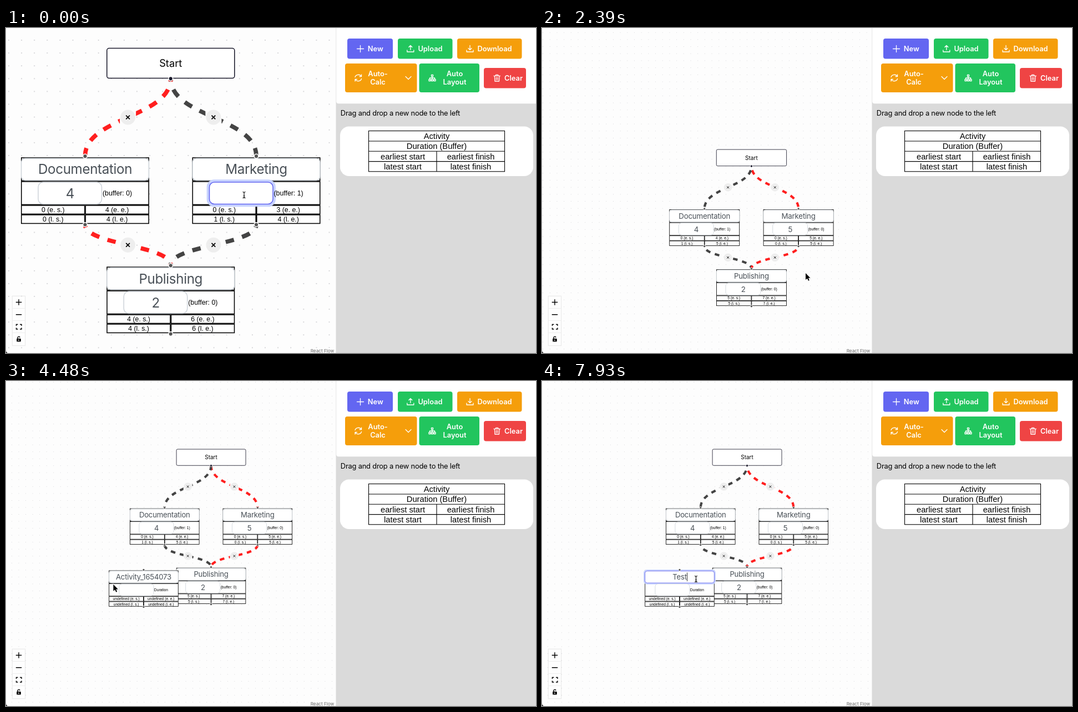
An HTML page for the animation above (8000 ms loop, 955 px wide and 586 px high).

```html
<!DOCTYPE html>
<html lang="en">
<head>
<meta charset="utf-8">
<title>Activity network editor</title>
<style>
  html, body { margin: 0; height: 100%; overflow: hidden; background: #fdfdfd; }
  svg { display: block; width: 100vw; height: 100vh; }
  text { font-family: Inter, Roboto, sans-serif; text-anchor: middle; white-space: pre; }
  .cell { font-family: "Liberation Sans", Arial, sans-serif; }
  .field { letter-spacing: -.015em; fill: #495057; }
  .left { text-anchor: start; }
  .btn { font-weight: 600; fill: #fff; }
  .icon { fill: none; stroke: #fff; stroke-width: 1.3; stroke-linecap: round; stroke-linejoin: round; }
</style>
</head>
<body>
<svg viewBox="0 0 955 586">
  <defs>
    <pattern id="dots" width="23.1" height="23.1" patternUnits="userSpaceOnUse" x="-6.5" y="10.5">
      <circle cx="11.5" cy="11.5" r=".65" fill="#81818a"/>
    </pattern>
    <filter id="shadow" x="-10%" y="-30%" width="120%" height="160%">
      <feDropShadow dx="0" dy="2" stdDeviation="4" flood-opacity=".3"/>
    </filter>
    <g id="table"></g>
  </defs>
  <rect width="955" height="586" fill="#fdfdfd"/>
  <g id="graph"></g>
  <g id="chrome"></g>
  <g id="overlay"></g>
</svg>
<script>
const LOOP = 8000, STEP = 149.6;
const RED = '#ff1f1f', DARK = '#444', INDIGO = '#6366f1', GREEN = '#22c55e', AMBER = '#f59e0b';
const $ = id => document.getElementById(id);

const text = (s, x, y, size, cls = '') =>
  `<text x="${x}" y="${y + size * .362}" font-size="${size}" class="${cls}">${s}</text>`;
const rect = (x, y, w, h, attrs) => `<rect x="${x}" y="${y}" width="${w}" height="${h}" ${attrs}/>`;
const path = (d, attrs) => `<path d="${d}" ${attrs}/>`;

// Linear interpolation through rows of [time, ...values]
function track(rows, t) {
  const i = rows.findIndex(r => r[0] > t);
  if (i < 0) return rows[rows.length - 1].slice(1);
  if (i === 0) return rows[0].slice(1);
  const a = rows[i - 1], b = rows[i], p = (t - a[0]) / (b[0] - a[0]);
  return a.slice(1).map((v, j) => v + (b[j + 1] - v) * p);
}

const VIEW = [
  [1800, 1, 0, 0], [2290, .549, 214.5, 199], [2400, .549, 214.5, 199],
  [2540, .543, 217.3, 201.7], [2900, .543, 208.4, 103.1]
];
const POINTER = [
  [0, 429, 301], [600, 429, 301], [1050, 466, 457], [1500, 475, 442], [2540, 475, 442],
  [2900, 469, 349], [2995, 469, 349], [3280, 777, 189], [3440, 537, 250], [3590, 340, 310],
  [3740, 182, 343], [4200, 182, 343], [4780, 205, 391], [5230, 270, 364], [5530, 293, 356],
  [5980, 285, 370], [6430, 277.5, 357]
];

const pen = document.createElement('canvas').getContext('2d');
pen.font = '24.2px Inter, Roboto, sans-serif';
const nameWidth = s => pen.measureText(s).width - s.length * .36;

const handle = (x, y, fill = '#555') =>
  `<circle cx="${x}" cy="${y}" r="3.85" fill="${fill}" stroke="#fff" stroke-width="1.54"/>`;

function input(x, y, w, h, r, state) {
  const border = state ? INDIGO : '#ced4da';
  const ring = state === 'focus'
    ? rect(x - 2.4, y - 2.4, w + 4.8, h + 4.8, `rx="${r + 2}" fill="none" stroke="#c7d2fe" stroke-width="4.9"`) : '';
  return ring + rect(x, y, w, h, `rx="${r}" fill="#fff" stroke="${border}" stroke-width="1.54"`);
}

const box = (x, y, w, h) =>
  rect(x + .77, y + .77, w - 1.54, h - 1.54, 'fill="#fff" stroke="#000" stroke-width="1.54"');

// times: earliest start, earliest end, latest start, latest end
function activity(cx, top, o) {
  const x = cx - 115.5, half = 115.5, field = cx - (o.note === 'Duration' ? 81.2 : 84.5);
  const [es, ee, ls, le] = o.times;
  const cell = (s, dx, dy) => text(s, cx + dx, top + dy, 12.3, 'cell');
  return box(x, top, 231, 43) + box(x, top + 43, 231, 43)
    + box(x, top + 86, half, 17) + box(cx, top + 86, half, 17)
    + box(x, top + 103, half, 17) + box(cx, top + 103, half, 17)
    + input(x + .6, top + 2, 229.8, 39.5, 7, o.nameState)
    + text(o.name, cx, top + 21.5, 24.2, 'field') + (o.caret || '')
    + input(field, top + 44.8, 114.5, 39.5, 9, o.valueState)
    + text(o.value, field + 57.5, top + 65, 24.2, 'field')
    + text(o.note, field + 116, top + 64.3, 12.3, 'cell left')
    + cell(`${es} (e. s.)`, -57.7, 94.3) + cell(`${ee} (e. e.)`, 57.7, 94.3)
    + cell(`${ls} (l. s.)`, -57.7, 111.5) + cell(`${le} (l. e.)`, 57.7, 111.5)
    + handle(cx, top - 2) + handle(cx, top + 121.3);
}

function edge(x0, y0, x1, y1, color, t) {
  const my = (y0 + y1) / 2, mx = (x0 + x1) / 2;
  return path(`M${x0} ${y0}C${x0} ${my} ${x1} ${my} ${x1} ${y1}`,
      `fill="none" stroke="${color}" stroke-width="7.7" stroke-dasharray="15.4" stroke-dashoffset="${10 - .02287 * t}"`)
    + rect(mx - 14.5, my - 14.5, 29, 29, 'fill="#fdfdfd"')
    + `<circle cx="${mx}" cy="${my}" r="13.4" fill="#eee"/>`
    + path(`M${mx - 3.4} ${my - 3.4}l6.8 6.8m0-6.8l-6.8 6.8`, 'stroke="#000" stroke-width="1.7"');
}

function newActivity(t) {
  const focused = t > 6550, cx = 72.9, top = 439.2;
  const typed = [7020, 7170, 7470, 7770].filter(at => t > at).length;
  const name = t < 6700 ? 'Activity_1654073' : 'Test'.slice(0, typed);
  const caret = t > 6700
    ? rect(cx + nameWidth(name) / 2 + .5, top + 7, 1.8, 29, 'fill="#333"') : '';
  return activity(cx, top, {
    name, caret, value: '', note: 'Duration', times: Array(4).fill('undefined'),
    nameState: focused ? 'focus' : t > 5250 ? 'hover' : ''
  });
}

function drawGraph(t) {
  const [k, x, y] = track(VIEW, t), done = t > 1190;
  const left = done ? DARK : RED, right = done ? RED : DARK;
  const L = 142.5, C = 296.75, R = 451;
  const end = done ? 5 : 4;
  $('graph').setAttribute('transform', `translate(${x} ${y}) scale(${k})`);
  $('graph').innerHTML = rect(-600, -600, 2400, 2400, 'fill="url(#dots)"')
    + edge(C, 91, R, 231, right, t) + edge(C, 91, L, 231, left, t)
    + edge(L, 354.5, C, 428, left, t) + edge(R, 354.5, C, 428, right, t)
    + rect(181.8, 36.6, 230, 54, 'rx="4" fill="#fff" stroke="#1a192b" stroke-width="1.54"')
    + text('Start', C, 63.7, 18.3, '') + handle(C, 91.3, '#1a192b')
    + activity(L, 233.2, {
        name: 'Documentation', value: 4, note: `(buffer: ${end - 4})`, times: [0, 4, end - 4, end] })
    + activity(R, 233.2, {
        name: 'Marketing', value: t > 500 ? 5 : '', valueState: done ? '' : 'focus',
        note: `(buffer: ${done ? 0 : 1})`, times: [0, done ? 5 : 3, done ? 0 : 1, end] })
    + activity(C, 430.3, {
        name: 'Publishing', value: 2, note: '(buffer: 0)', times: [end, end + 2, end, end + 2] })
    + (t > 4180 ? newActivity(t) : '');
}

function drawOverlay(t) {
  const [x, y] = track(POINTER, t);
  const beam = (t < 1100 && y < 318) || t > 4900;
  const ghost = t > 3330 && t < 4180
    ? `<g transform="translate(${x} ${y})">`
      + rect(-167, -4.5, 332, 74.5, 'fill="#fff" opacity=".87" filter="url(#shadow)"')
      + '<use href="#table" x="-124" y="-3"/></g>' : '';
  const arrow = 'M0 0V12L2.9 9.4L4.9 13.8L6.8 13L4.9 8.7H8.5Z';
  const ibeam = 'M-2.5-5.5Q0-5.5 0-3.5Q0-5.5 2.5-5.5M0-4V4M-2.5 5.5Q0 5.5 0 3.5Q0 5.5 2.5 5.5M-1.3 1.8H1.3';
  const cursor = beam
    ? path(ibeam, 'fill="none" stroke="#fff" stroke-width="2.6"') + path(ibeam, 'fill="none" stroke="#000" stroke-width="1.1"')
    : path(arrow, 'stroke="#fff" stroke-width="1.6" paint-order="stroke"');
  $('overlay').innerHTML = ghost + `<g transform="translate(${x} ${y})">${cursor}</g>`;
}

function button(x, y, w, h, color, icon, lines, tx) {
  return rect(x, y, w, h, `rx="4" fill="${color}"`) + path(icon, 'class="icon"')
    + lines.map((s, i) => text(s, tx, y + h / 2 + (i - (lines.length - 1) / 2) * 15.2, 12.85, 'btn')).join('');
}

function drawChrome() {
  const line = 'fill="none" stroke="#000" stroke-width="1.1"';
  $('table').innerHTML = rect(.5, .5, 245, 73.3, line)
    + path('M.5 19H245.5M.5 37.3H245.5M.5 55.6H245.5M123 37.3V73.8', line)
    + text('Activity', 123, 9.7, 14.7, 'cell') + text('Duration (Buffer)', 123, 28, 14.7, 'cell')
    + text('earliest start', 62, 46.4, 14.7, 'cell') + text('earliest finish', 184.5, 46.4, 14.7, 'cell')
    + text('latest start', 62, 64.8, 14.7, 'cell') + text('latest finish', 184.5, 64.8, 14.7, 'cell');

  const tray = 'V43H{R}V40';
  const trayAt = x => `M${x - 6} 40V43H${x + 6}V40`;
  const sidebar = rect(594.5, 0, 361, 586, 'fill="#dadada"')
    + rect(595.2, -10, 370, 146.3, 'rx="4" fill="#fff"')
    + button(615, 19, 82, 36.5, INDIGO, 'M632.5 37.5h12m-6-6v12', ['New'], 665.8)
    + button(706, 19, 98.5, 36.5, GREEN, trayAt(728.8) + 'M728.8 39.5V31.5m-3 3l3-3l3 3', ['Upload'], 764.5)
    + button(813, 19, 116.5, 36.5, AMBER, trayAt(836) + 'M836 31.5V39.5m-3-3l3 3l3-3', ['Download'], 880.5)
    + button(611, 64, 129.5, 52, AMBER,
        'M629 88.5A6 5.5 0 0 1 640 87M640.5 84v3.5h-3.5M640.5 91.5A6 5.5 0 0 1 629.5 93M629 96v-3.5h3.5M720 87.5l5 5l5-5',
        ['Auto-', 'Calc'], 670)
    + button(744.5, 64, 108.5, 52, GREEN,
        'M766.5 84.5h3v3h-3zM762 92.5h3v3h-3zM766.5 92.5h3v3h-3zM771 92.5h3v3h-3zM768 87.5v5M763.5 92.5v-2.5h9v2.5',
        ['Auto', 'Layout'], 808.5)
    + button(861, 72, 76, 36.5, '#ef4444',
        'M879 86.3h11.4M880.3 86.3l.6 9.7h7.6l.6-9.7M882.6 86.3v-2h4v2M883.4 89v4.5M886 89v4.5', ['Clear'], 914.5)
    + text('Drag and drop a new node to the left', 710.5, 153.7, 12.85, 'field').replace('<text', '<text style="fill:#000"')
    + rect(602, 177.5, 348, 89.5, 'rx="16" fill="#fff"')
    + '<use href="#table" x="653" y="185"/>';

  const thin = 'fill="none" stroke="#000" stroke-width="1.4"';
  const controls = rect(11.5, 483.5, 23, 89, 'fill="none" stroke="#000" stroke-opacity=".07" stroke-width="1.6"')
    + rect(12, 484, 22, 88, 'fill="#fefefe"')
    + path('M12 505.5h22M12 527.5h22M12 549.5h22', 'stroke="#eee"')
    + path('M17.8 494.5h10.4M23 489.3v10.4M17.8 516.7h10.4', thin)
    + path('M18.5 537v-2.5h3M25 534.5h3v2.5M28 540.5v2.5h-3M21.5 543h-3v-2.5', thin)
    + rect(19.2, 560, 7.6, 5.6, 'rx=".8"')
    + path('M20.8 560v-1.3a2.2 2.2 0 0 1 4.3-.6', thin)
    + '<circle cx="23" cy="562.8" r="1" fill="#fff"/>';

  $('chrome').innerHTML = rect(546, 577, 48.5, 9, 'fill="#fff" opacity=".5"')
    + text('React Flow', 570, 582, 8.2, '').replace('<text', '<text fill="#666"')
    + controls + sidebar + path('M0 581Q0 586 4 586H0Z', 'fill="#000"');
}

// The screen refreshes in steps of about 150 ms
let shown = -1;
function tick(now) {
  const n = Math.floor((now % LOOP + 13) / STEP);
  if (n !== shown) {
    shown = n;
    drawGraph(n * STEP);
    drawOverlay(n * STEP);
  }
  requestAnimationFrame(tick);
}

drawChrome();
tick(0);
</script>
</body>
</html>
```
